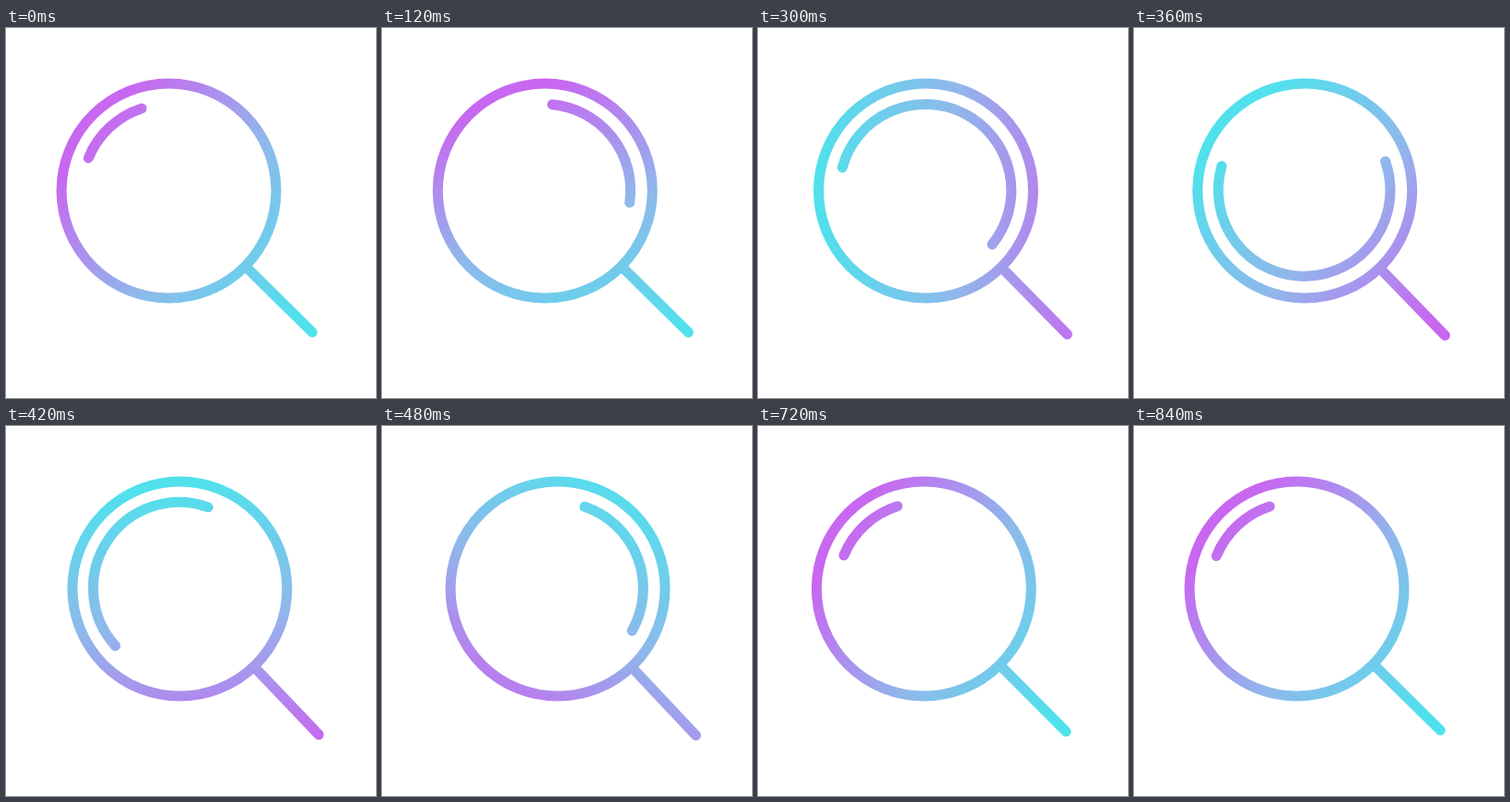
An HTML page that plays this animation: 400x400 px, repeating every 2870 ms.

```html
<!DOCTYPE html>
<html lang="en">
<head>
<meta charset="utf-8">
<title>Magnifier</title>
<style>
  html, body { margin: 0; width: 100%; height: 100%; overflow: hidden; background: #fff; }
  svg { display: block; width: 100%; height: 100%; }
</style>
</head>
<body>
<svg viewBox="0 0 400 400">
  <defs>
    <linearGradient id="tint" gradientUnits="userSpaceOnUse">
      <stop offset="0" stop-color="#c867f0"/>
      <stop offset="0.5" stop-color="#8fb8eb"/>
      <stop offset="1" stop-color="#50e1ec"/>
    </linearGradient>
  </defs>
  <g fill="none" stroke="url(#tint)" stroke-width="11" stroke-linecap="round">
    <circle id="ring" cy="176" r="116"/>
    <path id="handle"/>
    <path id="shine"/>
  </g>
</svg>
<script>
const LOOP = 2870, STEP = 30, MOVE = 840;
const CENTER = 176, SHINE_R = 93;

const el = id => document.getElementById(id);
const set = (node, attrs) => {
  for (const key in attrs) node.setAttribute(key, attrs[key]);
};
const polar = (x, y, r, deg) => {
  const a = deg * Math.PI / 180;
  return [x + r * Math.cos(a), y + r * Math.sin(a)];
};

// Progress from 0 to 1 between two times
const ramp = (t, from, to) => Math.min(1, Math.max(0, (t - from) / (to - from)));
const smooth = u => u * u * (3 - 2 * u);

// The glass swings right, then drops back
const swing = t => 14.5 * smooth(ramp(t, 0, 520)) ** 2 * (1 - ramp(t, 520, MOVE)) ** 1.5;

// The colours make one eased turn
const tintAngle = t => 220 + 360 * smooth(1 - (1 - ramp(t, 0, MOVE)) ** 1.25);

// The shine speeds up, coasts and stops after three turns, stretching on the way
const shineAngle = t => 227 + 580 * ramp(t, 0, 360) ** 1.65 + 500 * ramp(t, 360, 600);
const shineLength = t => 50 + 166 * smooth(ramp(t, 0, 360)) * (1 - ramp(t, 360, 600)) ** 1.7;

function draw(time) {
  const t = Math.min(MOVE, Math.floor(time / STEP) * STEP);
  const dx = swing(t), x = CENTER + dx, tilt = dx * 0.15;
  set(el('ring'), { cx: x });

  const inner = polar(x, CENTER, 120, 44.6 + tilt);
  const outer = polar(x, CENTER, 217.8, 44.6 + tilt);
  set(el('handle'), { d: `M${inner}L${outer}` });

  const mid = shineAngle(t) + tilt, length = shineLength(t);
  const from = polar(x - 0.6, CENTER - 0.6, SHINE_R, mid - length / 2);
  const to = polar(x - 0.6, CENTER - 0.6, SHINE_R, mid + length / 2);
  set(el('shine'), { d: `M${from}A${SHINE_R} ${SHINE_R} 0 ${length > 180 ? 1 : 0} 1 ${to}` });

  const angle = tintAngle(t);
  const [x1, y1] = polar(x + 32, CENTER + 32, 148, angle);
  const [x2, y2] = polar(x + 32, CENTER + 32, 148, angle + 180);
  set(el('tint'), { x1, y1, x2, y2 });
}

const start = performance.now();
function tick() {
  draw((performance.now() - start) % LOOP);
  requestAnimationFrame(tick);
}
tick();
</script>
</body>
</html>
```
